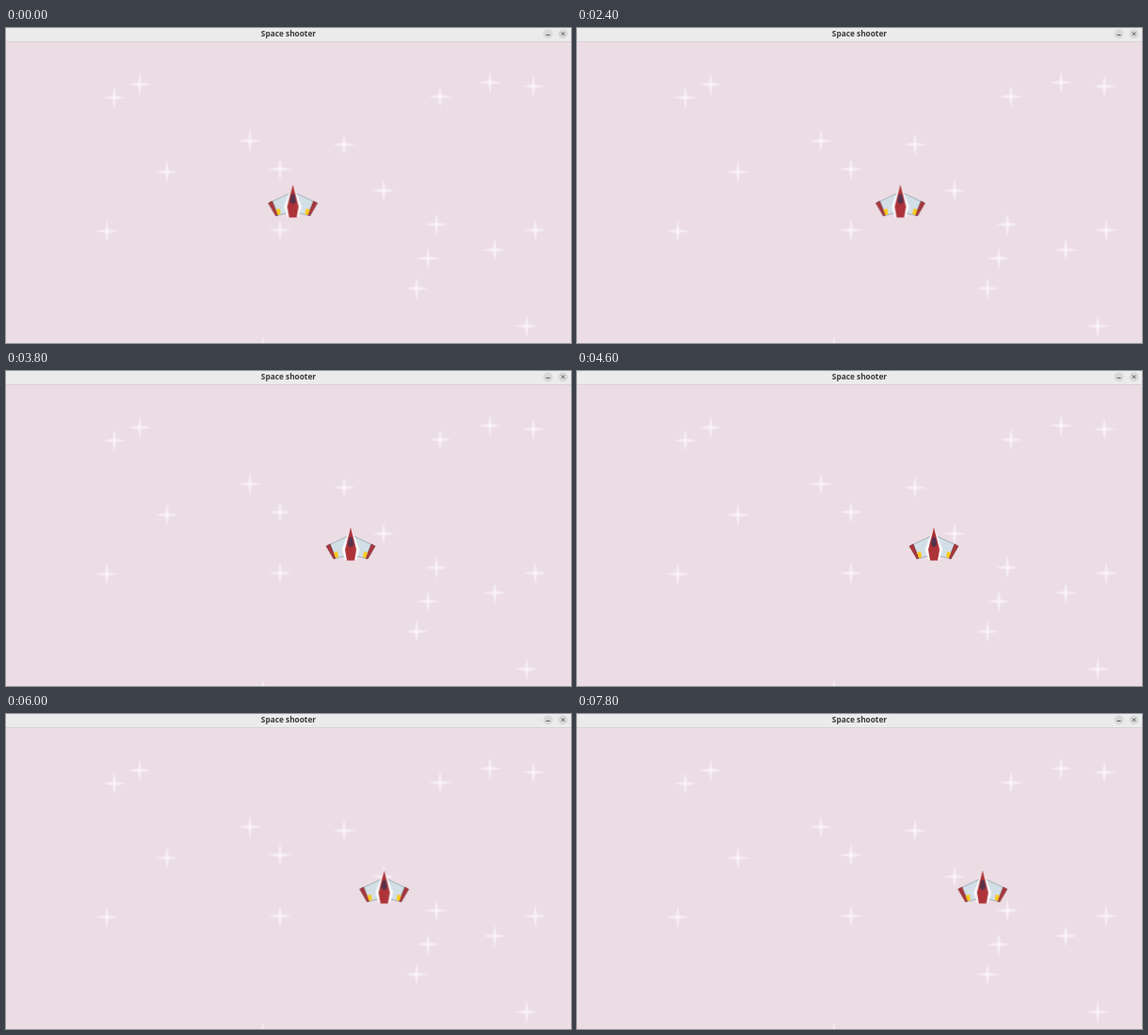
Write an HTML page that moves like this. It is 600 px wide and 335 px high and loops after 8 s.

```html
<!DOCTYPE html>
<html lang="en">
<head>
<meta charset="utf-8">
<title>Space shooter</title>
<style>
  html, body { margin: 0; width: 100%; height: 100%; overflow: hidden; background: #ecdde4; }
  svg { display: block; width: 600px; height: 335px; }
  .title { font: 700 8.3px "Noto Sans", "Open Sans", sans-serif; fill: #3a3a3a; text-anchor: middle; }
  .stars { fill: none; marker: url(#star); }
  .ship { --speed: 16.17px; animation: fly 8s steps(40, end) infinite; }
  @keyframes fly {
    from { transform: translate(304.6px, 166px); }
    to { transform: translate(calc(304.6px + 8 * var(--speed)), 166px); }
  }
</style>
</head>
<body>
<svg viewBox="0 0 600 335">
  <defs>
    <radialGradient id="glow">
      <stop offset="0" stop-color="#fbf5fb" stop-opacity=".75"/>
      <stop offset=".6" stop-color="#fbf5fb" stop-opacity=".6"/>
      <stop offset="1" stop-color="#fbf5fb" stop-opacity="0"/>
    </radialGradient>
    <marker id="star" viewBox="-13 -13 26 26" markerWidth="26" markerHeight="26" markerUnits="userSpaceOnUse">
      <g fill="url(#glow)">
        <ellipse rx="12.5" ry="2.2"/>
        <ellipse rx="2.2" ry="12.5"/>
      </g>
    </marker>
    <g id="half" stroke-linejoin="round">
      <path d="M-4 10L-22 18.5L-16.5 33.5L-7 31Z" fill="#d3dfe7" stroke="#879ba4" stroke-width=".7"/>
      <path d="M-22 18L-26 20.3L-18 34L-16 33Z" fill="#a9363b" stroke="#743039" stroke-width=".6"/>
      <path d="M-18 27L-14 26L-13 32L-16 33Z" fill="#fcc916"/>
      <path d="M0 2L-4.6 11L-9.4 24L-6 35H0Z" fill="#fbf8fa"/>
      <path d="M.1 .5L-2.5 10L-6 24L-4 35.4H.1Z" fill="#ad3439"/>
      <path d="M.1 10L-2 12L-3.2 19L.1 21.5Z" fill="#54344c"/>
    </g>
    <g id="button">
      <circle r="5" fill="#d8d8d8"/>
    </g>
  </defs>

  <rect width="600" height="335" fill="#ecdde4"/>
  <polyline class="stars" points="115,74 142,60 171,153 107,216 259,120 291,150 291,215 273,340 359,124 401,173
    457,209 448,245 436,277 553,317 519,236 562,215 560,62 514,58 461,73"/>

  <rect width="600" height="14.4" fill="#ebebeb"/>
  <rect y="14" width="600" height=".8" fill="#d5d0d2"/>
  <text class="title" x="300" y="9">Space shooter</text>
  <g fill="none" stroke="#444" stroke-width=".9">
    <g transform="translate(575.5 6.2)"><use href="#button" stroke="none"/><path d="M-2 1.2H2"/></g>
    <g transform="translate(591.5 6.2)"><use href="#button" stroke="none"/><path d="M-1.7 -1.7L1.7 1.7M1.7 -1.7L-1.7 1.7"/></g>
  </g>

  <g class="ship">
    <use href="#half"/>
    <use href="#half" transform="scale(-1 1)"/>
  </g>
</svg>
</body>
</html>
```
